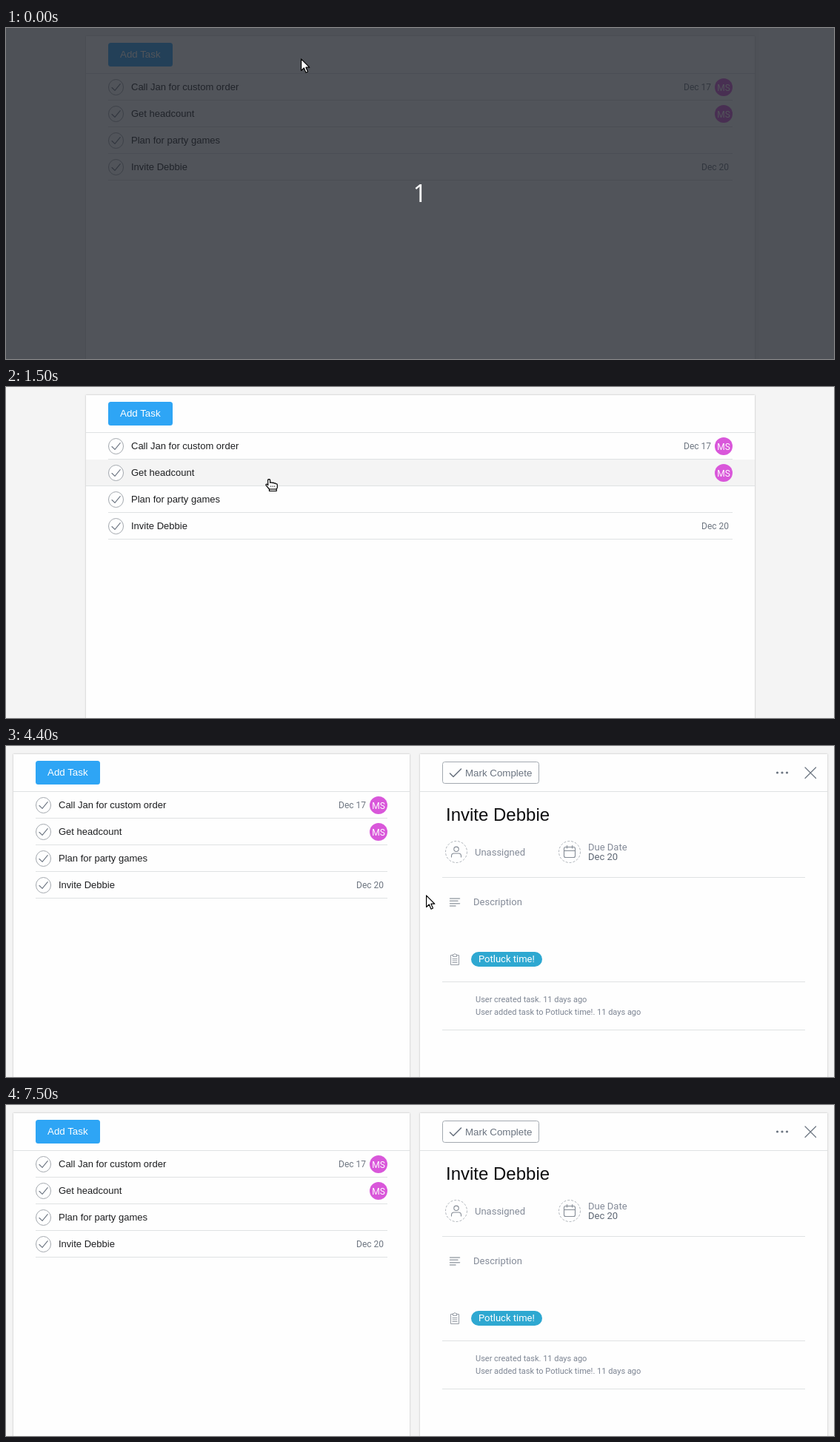
These frames come from a looping animation (1118x447 px, 7.7 s). An HTML page:

```html
<!DOCTYPE html>
<html lang="en">
<head>
<meta charset="utf-8">
<title>Task list</title>
<style>
  html, body { margin: 0; width: 100%; height: 100%; overflow: hidden; background: #f4f4f4; }
  svg { display: block; width: 1118px; height: 447px; }
  text { white-space: pre; }
  .ui { font-family: "Liberation Sans", Arial, sans-serif; }
  .body { font-family: Roboto, sans-serif; }
  .count { font-family: "Noto Sans", sans-serif; }
  .panel { fill: #fefefe; filter: drop-shadow(0 0 1px rgba(0, 0, 0, .25)); }
  .icon { fill: none; stroke-linecap: round; stroke-linejoin: round; }
</style>
</head>
<body>
<svg id="stage" viewBox="0 0 1118 447"></svg>
<script>
const LOOP = 7700, STEP = 100;
const OPEN = 3400, LEAVE = 7500;
const ROW_TOP = 62, ROW_H = 36;
const GREY = '#6b7480', SOFT = '#848b98', EDGE = '#dfe2e3', HOVER = '#f4f4f4';

const tasks = [
  { name: 'Call Jan for custom order', due: 'Dec 17', who: 'MS' },
  { name: 'Get headcount', who: 'MS' },
  { name: 'Plan for party games' },
  { name: 'Invite Debbie', due: 'Dec 20' }
];

// Pointer tip: time, x, y
const path = [
  [200, 398, 41], [900, 374, 84], [1000, 374, 84], [1500, 355, 124],
  [1800, 346, 165], [2200, 344, 188], [4100, 344, 188], [4400, 567, 201],
  [4500, 567, 201], [5000, 654, 139], [5300, 690, 141], [5600, 785, 138],
  [6000, 785, 138], [6100, 782, 136]
];

function pointer(t) {
  if (t <= path[0][0]) return path[0].slice(1);
  const i = path.findIndex(p => p[0] >= t);
  if (i < 0) return path[path.length - 1].slice(1);
  const [t0, x0, y0] = path[i - 1], [t1, x1, y1] = path[i];
  const k = (t - t0) / (t1 - t0);
  return [Math.round(x0 + (x1 - x0) * k), Math.round(y0 + (y1 - y0) * k)];
}

const inside = ([x, y], l, t, r, b) => x >= l && x < r && y >= t && y < b;

const rect = (x, y, w, h, fill, more = '') =>
  `<rect x="${x}" y="${y}" width="${w}" height="${h}" fill="${fill}" ${more}/>`;
const rule = (x0, x1, y) => rect(x0, y, x1 - x0, 1, EDGE);
const text = (x, y, str, size, fill, font = 'body', more = '') =>
  `<text class="${font}" x="${x}" y="${y}" font-size="${size}" fill="${fill}" ${more}>${str}</text>`;
const icon = (d, color, width = 1.1) =>
  `<path class="icon" d="${d}" stroke="${color}" stroke-width="${width}"/>`;
const panel = (l, r) =>
  rect(l, 11, r - l, 460, '#fefefe', 'class="panel"') + rule(l, r, 61);

function row(task, i, l, r, hot) {
  const y = ROW_TOP + i * ROW_H, mid = y + 18, a = l + 30, b = r - 30;
  let s = hot
    ? rect(l, y, r - l, ROW_H, HOVER) + rule(l, r, y + 35)
    : rule(a, b, y + 35);
  s += `<ellipse cx="${a + 10.5}" cy="${mid}" rx="10" ry="10.5" fill="#fefefe" stroke="#a3a8ae"/>`;
  s += icon(`M${a + 5} ${mid + .5}l4 3.8l7.2-8.6`, GREY);
  s += text(a + 31, mid + 4, task.name, 13, '#1e1f21', 'ui');
  if (task.due) s += text(b - (task.who ? 29 : 5), mid + 4, task.due, 12, '#6f7782', 'body', 'text-anchor="end"');
  if (task.who) {
    s += `<circle cx="${b - 12}" cy="${mid}" r="12" fill="#d957da"/>`;
    s += text(b - 12, mid + 5, task.who, 12, '#fff', 'body', 'text-anchor="middle"');
  }
  return s;
}

function list(l, r, pos) {
  const hot = pos && inside(pos, l, ROW_TOP, r, ROW_TOP + 4 * ROW_H)
    ? Math.floor((pos[1] - ROW_TOP) / ROW_H) : -1;
  return panel(l, r)
    + rect(l + 30, 20, 87, 32, '#2ea5f5', 'rx="3.5"')
    + text(l + 46, 40, 'Add Task', 13.333, '#fff', 'ui')
    + tasks.map((task, i) => row(task, i, l, r, i === hot)).join('');
}

// Rounded field with a ringed icon
function field(x, hot, d) {
  const ring = hot ? `stroke="${GREY}"` : 'stroke="#b0b5bb" stroke-dasharray="3 2"';
  return (hot ? rect(x + .5, 124.5, 122, 37, HOVER, `rx="18.5" stroke="${GREY}"`) : '')
    + `<circle cx="${x + 19}" cy="143" r="14.5" fill="none" ${ring}/>`
    + icon(d, hot ? '#3f444c' : '#858c96');
}

function details(pos) {
  const who = pos && inside(pos, 589, 124, 712, 162);
  const due = pos && inside(pos, 742, 124, 865, 162);
  let s = panel(559, 1109)
    + rect(589.5, 21.5, 130, 29, '#fefefe', 'rx="3" stroke="#a3a9b0"')
    + icon('M599.5 37l4.5 4.5l10.5-10.5', GREY, 1.6)
    + text(620, 41, 'Mark Complete', 13.333, GREY, 'ui')
    + [1041.5, 1048, 1054.5].map(x => `<circle cx="${x}" cy="36" r="1.6" fill="${GREY}"/>`).join('')
    + icon('M1079 29l14.5 14.5M1093.5 29l-14.5 14.5', GREY, 1.2)
    + text(594, 101, 'Invite Debbie', 24, '#0c0c0e', 'ui');

  s += field(589, who, 'M604.8 139.3a3.2 3.2 0 1 0 6.4 0a3.2 3.2 0 1 0-6.4 0M601.5 150v-1.5q0-3.5 3.5-3.5h6q3.5 0 3.5 3.5v1.5')
    + text(633, 148, 'Unassigned', 13, SOFT)
    + field(742, due, 'M755.5 136.5h11q2 0 2 2v10q0 2-2 2h-11q-2 0-2-2v-10q0-2 2-2zM753.5 141.5h15M757.5 134.5v3.5M764.5 134.5v3.5')
    + text(786, 141, 'Due Date', 13, SOFT)
    + text(786, 154, 'Dec 20', 13, '#5d6673');
  if (due) s += '<circle cx="851" cy="143" r="8" fill="#78818b"/>'
    + icon('M848.7 140.7l4.6 4.6M853.3 140.7l-4.6 4.6', '#fff', 1.3);

  s += [177, 318, 383].map(y => rule(589, 1079, y)).join('')
    + icon('M599.5 206h13M599.5 209.3h10.5M599.5 212.7h13M599.5 216h7.5', '#a0a6ad', 1.5)
    + text(631, 215, 'Description', 13, SOFT)
    + icon('M603 282.5h-2.5v13h11v-13h-2.5M603.5 284v-2.5h1.2q1.3-2 2.6 0h1.2v2.5zM603 287.5h6M603 290h6M603 292.5h6', '#969ca5', 1)
    + rect(628, 278, 96, 20, '#2ea8d1', 'rx="10"')
    + text(638, 292, 'Potluck time!', 13, '#fff')
    + text(634, 346, 'User created task. 11 days ago', 11, '#7d8593')
    + text(634, 363, 'User added task to Potluck time!. 11 days ago', 11, '#7d8593');
  return s;
}

function cursor([x, y], open) {
  const clickable = inside([x, y], open ? 10 : 108, ROW_TOP, open ? 545 : 1011, ROW_TOP + 4 * ROW_H)
    || open && (inside([x, y], 589, 124, 712, 162) || inside([x, y], 742, 124, 865, 162));
  const style = 'fill="#fff" stroke="#000" stroke-width="1.2" stroke-linejoin="round"';
  return clickable
    ? `<g transform="translate(${x - 5} ${y})" ${style}>
        <path d="M3.6 1.6C3.8.3 6.4.3 6.6 1.6V5.3C8 4.6 9 5 9.3 5.6C10.5 5 11.5 5.3 12 6.1C13.2 5.6 14 6 14.5 6.8C15.8 6.5 16.3 7.3 16.3 8.2V12L15.2 14V16.5H5.5V14L1 8.6C.5 7.2 2 6.6 3 7.6L3.8 8.6Z"/>
        <path d="M5.5 14H15.2" fill="none"/>
        <path d="M7.7 9.5v1.3M10.2 9.5v1.3M12.7 9.5v1.3" stroke-width="1"/></g>`
    : `<path transform="translate(${x} ${y})" ${style}
        d="M.6.8V16.5L4.3 13L7 19.2L9.5 18L6.9 12.2H11.8Z"/>`;
}

function scene(t) {
  const open = t >= OPEN;
  const pos = t < LEAVE ? pointer(t) : null;
  let s = rect(0, 0, 1118, 447, '#f4f4f4');
  s += open ? list(10, 545, pos) + details(pos) : list(108, 1011, pos);
  if (t < 100) {
    s += rect(0, 0, 1118, 447, 'rgba(32,37,44,.78)');
    s += text(559, 235, '1', 32, '#fff', 'count', 'text-anchor="middle"');
  }
  return pos ? s + cursor(pos, open) : s;
}

const stage = document.getElementById('stage');
let shown = -1;
function draw() {
  const t = Math.floor(performance.now() % LOOP / STEP) * STEP;
  if (t !== shown) stage.innerHTML = scene(shown = t);
  requestAnimationFrame(draw);
}
draw();
</script>
</body>
</html>
```
